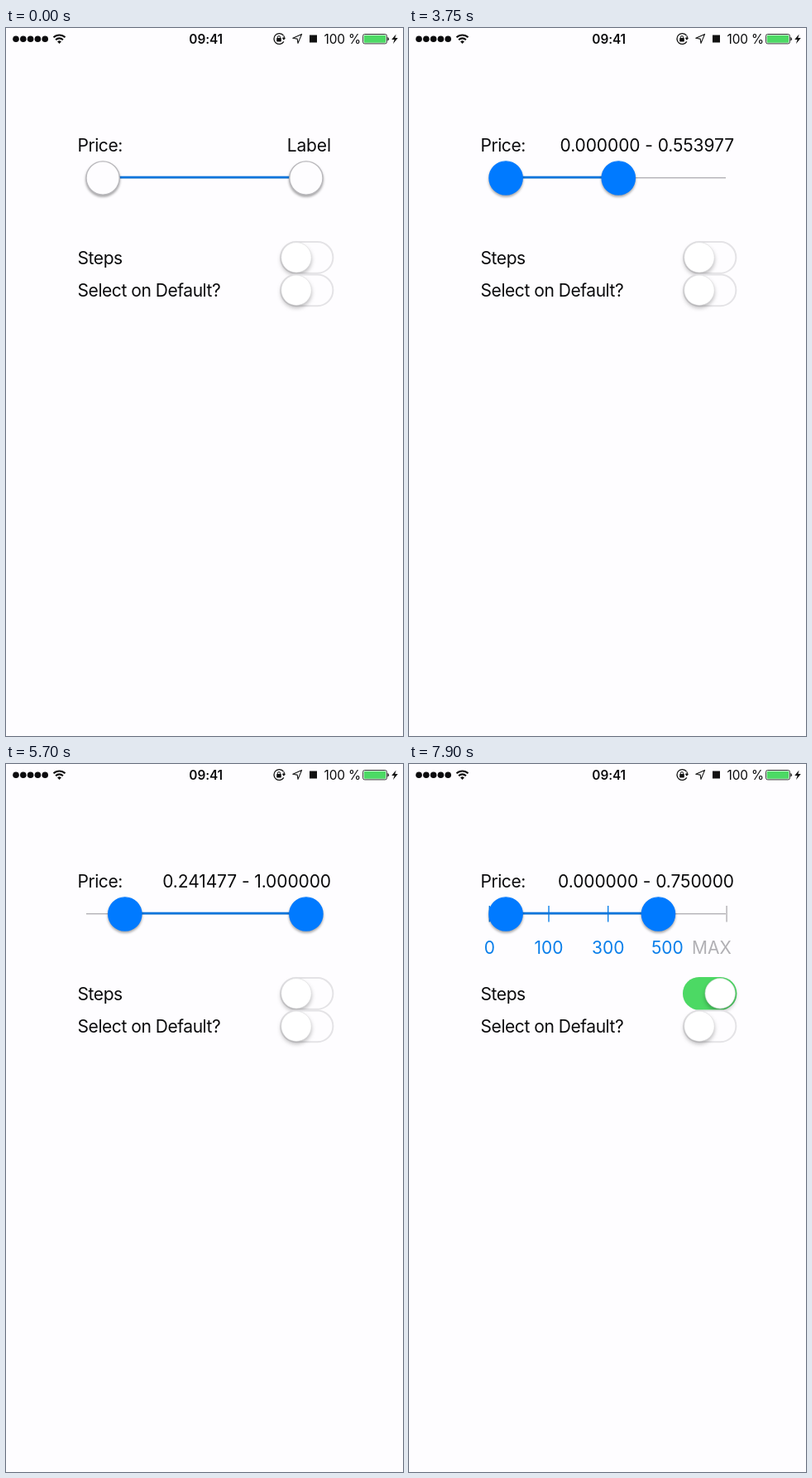
Recreate the animation shown at these times as an HTML page. Size 480 by 854 pixels, loop 8000 ms.

```html
<!DOCTYPE html>
<html lang="en">
<head>
<meta charset="utf-8">
<title>Range slider</title>
<style>
  html, body { margin: 0; width: 100%; height: 100%; overflow: hidden; background: #fefdff; }
  svg { display: block; width: 100%; height: 100%; }
  text { font: 21px Inter, "Open Sans", sans-serif; letter-spacing: -.45px; fill: #0b0b0d; }
  .bar text { font-size: 15.4px; letter-spacing: -.1px; }
  .bar .time { font-weight: 600; text-anchor: middle; }
  .line { fill: none; stroke: #111; stroke-width: 1.3; stroke-linejoin: round; }
  #value { text-anchor: end; letter-spacing: -.1px; }
  #steps text { text-anchor: middle; letter-spacing: 0; }
  .thumb { stroke-width: 1.4; filter: drop-shadow(0 2.5px 1.8px rgba(0, 0, 0, .36)); }
  .off { fill: #fefdff; stroke: #e4e3e6; stroke-width: 2; }
  .on { fill: #4cd964; opacity: 0; }
  .knob { fill: #fff; stroke: #d9d8db; stroke-width: .6; filter: drop-shadow(0 3px 2.6px rgba(0, 0, 0, .26)); }
</style>
</head>
<body>
<svg viewBox="0 0 480 854">
  <g class="bar">
    <g id="dots" fill="#0b0b0d"></g>
    <g class="line" stroke-width="2">
      <path d="M57.5 11.3a10 10 0 0 1 14 0M60.1 14.2a6.2 6.2 0 0 1 8.8 0" style="stroke-width:2.1"/>
      <path d="M64.5 19l-2.4-2.6a3.4 3.4 0 0 1 4.8 0z" fill="#111" stroke="none"/>
    </g>
    <text class="time" x="241.7" y="18.6">09:41</text>
    <path class="line" d="M335.5 9.2A6.4 6.4 0 1 0 335.8 16.4M336.2 9.6v3.2"/>
    <path d="M333.6 11.8h4.6l-2.3 3z" fill="#111"/>
    <rect x="327.2" y="12" width="5.6" height="4.4" rx=".6" fill="#111"/>
    <path class="line" d="M328.4 12.4v-1.2a1.6 1.6 0 0 1 3.2 0v1.2" style="stroke-width:1"/>
    <path class="line" d="M357.6 7.4L346.8 12.3L352.2 13.1L353 18.4Z" style="stroke-width:1.1"/>
    <rect x="367" y="8.5" width="9" height="9" fill="#111"/>
    <text x="384.5" y="18.6">100 %</text>
    <rect x="431.6" y="7.5" width="28.8" height="11.4" rx="2" fill="none" stroke="#333" stroke-width="1"/>
    <rect x="432.8" y="8.7" width="26.4" height="9" rx="1" fill="#4cd964"/>
    <path d="M461.4 11a2.3 2.3 0 0 1 0 4.4z" fill="#222"/>
    <path d="M471.6 7.4L466.2 14h3.4l-1.6 5l5.8-6.9h-3.4z" fill="#111"/>
  </g>

  <text x="86.6" y="148.8">Price:</text>
  <text id="value" x="393" y="148.8">Label</text>
  <text x="86.6" y="284.6">Steps</text>
  <text x="86.6" y="324.2">Select on Default?</text>

  <rect x="97" y="180" width="286" height="1.4" fill="#b3b2b6"/>
  <g id="steps"></g>
  <rect id="range" y="178.7" height="2.8" fill="#0e76dc"/>
  <g id="thumbs"></g>
  <g id="switches"></g>
</svg>
<script>
const $ = id => document.getElementById(id);
const set = (el, attrs) => { for (const k in attrs) el.setAttribute(k, attrs[k]); return el; };
const add = (parent, tag, attrs) =>
  parent.appendChild(set(document.createElementNS('http://www.w3.org/2000/svg', tag), attrs));

const BLUE = '#007aff', GREY = '#b1b0b4';
const LOW = 0.241477, HIGH = 0.553977;

for (let i = 0; i < 5; i++) add($('dots'), 'circle', { cx: 12 + i * 8.8, cy: 13.2, r: 3.8 });

const steps = ['0', '100', '300', '500', 'MAX'].map((name, i) => {
  const x = 97.3 + i * 71.7;
  const tick = add($('steps'), 'rect', { x: x - .7, y: 171, width: 1.4, height: 19.5 });
  const label = add($('steps'), 'text', { x: i < 4 ? x : 366, y: 228.8 });
  label.textContent = name;
  return { at: i / 4, tick, label };
});

const thumbs = [0, 1].map(() => add($('thumbs'), 'circle', { class: 'thumb', cy: 181, r: 20.1 }));

const switches = [256.9, 296.4].map(y => {
  const g = $('switches');
  add(g, 'rect', { class: 'off', x: 332, y: y + 1, width: 63.4, height: 37.8, rx: 18.9 });
  const on = add(g, 'rect', { class: 'on', x: 331, y, width: 65.4, height: 39.8, rx: 19.9 });
  const knob = add(g, 'rect', { class: 'knob', x: 332.8, y: y + 1.7, width: 36.4, height: 36.4, rx: 18.2 });
  return { on, knob };
});

const smooth = (t, from, to) => {
  const p = Math.min(1, Math.max(0, (t - from) / (to - from)));
  return p * p * (3 - 2 * p);
};

// Each move is [start, end, target value].
const follow = (t, value, moves) =>
  moves.reduce((v, [from, to, target]) => v + (target - v) * smooth(t, from, to), value);

const lowMoves = [
  [3050, 3350, .22], [3350, 3650, 0], [3800, 4000, .295], [4000, 4400, LOW], [5300, 6050, 0]
];
const highMoves = [[2180, 2750, HIGH], [4550, 5050, 1], [7180, 7850, .75]];

// The price text changes when a thumb is released.
const releases = [
  [7900, 0, .75], [6100, 0, 1], [5150, LOW, 1], [4400, LOW, HIGH], [2850, 0, HIGH]
];

function draw(t) {
  const low = follow(t, 0, lowMoves), high = follow(t, 1, highMoves);
  const active = low > .004 || high < .996;
  const xs = [low, high].map(v => 117.1 + v * 245.8);

  thumbs.forEach((el, i) => set(el, {
    cx: xs[i], fill: active ? BLUE : '#fefdff', stroke: active ? BLUE : '#b9b8bc'
  }));
  set($('range'), { x: xs[0], width: xs[1] - xs[0] });

  const released = releases.find(r => t >= r[0]);
  $('value').textContent = released
    ? released[1].toFixed(6) + ' - ' + released[2].toFixed(6) : 'Label';

  $('steps').style.display = t >= 6700 ? '' : 'none';
  for (const { at, tick, label } of steps) {
    const color = active && at >= low - .004 && at <= high + .004 ? '#0a7fea' : GREY;
    tick.style.fill = label.style.fill = color;
  }

  const press = smooth(t, 6550, 6700) - smooth(t, 6750, 7000);
  const slide = smooth(t, 6650, 7000);
  const { on, knob } = switches[0];
  on.style.opacity = slide;
  set(knob, { x: 332.8 + slide * (25.2 - press * 8), width: 36.4 + press * 8 });
}

function frame(now) {
  draw(Math.floor(now % 8000 / 50) * 50);
  requestAnimationFrame(frame);
}
draw(0);
requestAnimationFrame(frame);
</script>
</body>
</html>
```
